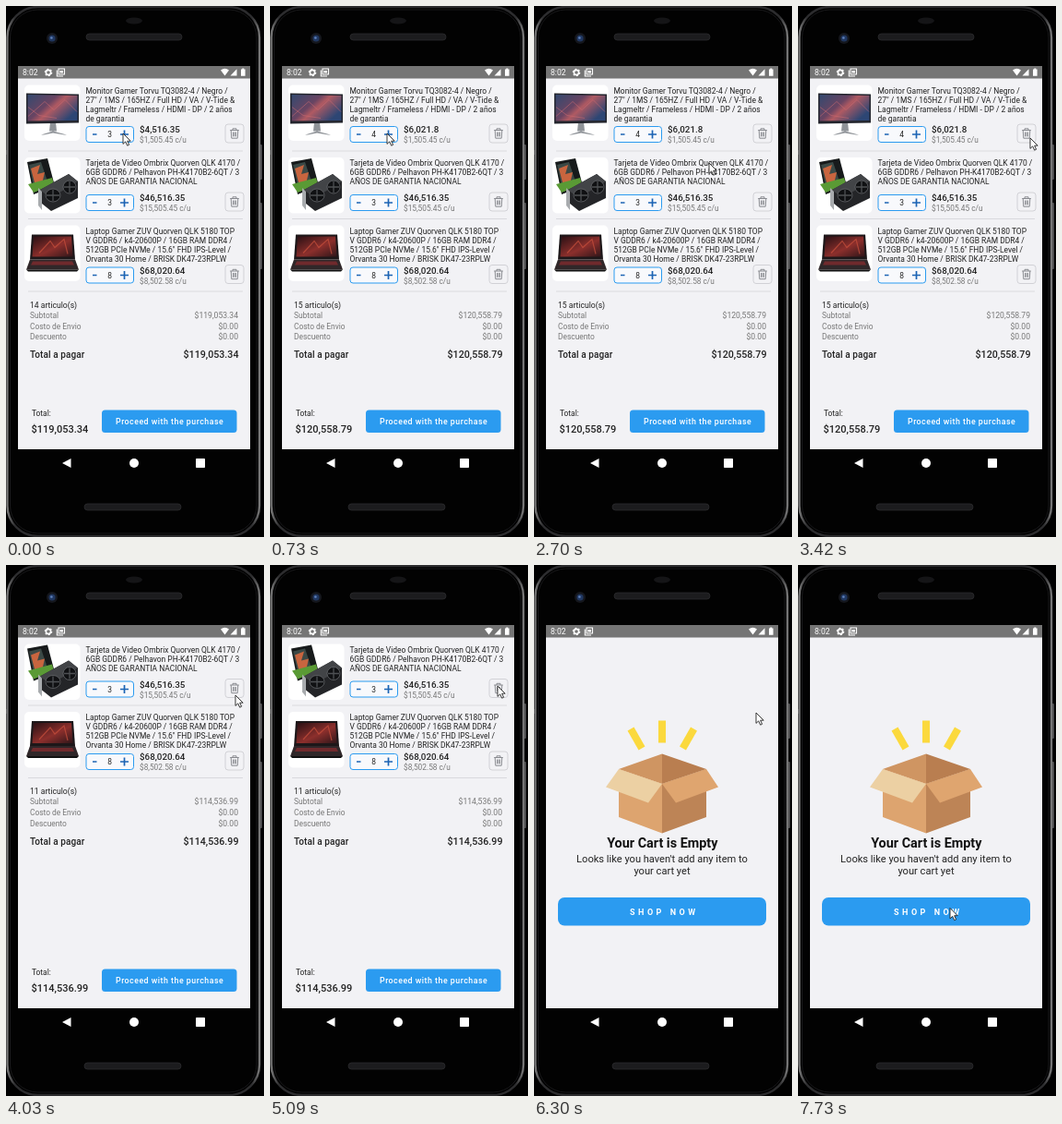
These frames come from a looping animation (280 px wide and 575 px high, 7790 ms). An HTML page:

```html
<!DOCTYPE html>
<html lang="es">
<head>
<meta charset="utf-8">
<title>Cart</title>
<style>
  html, body { margin: 0; width: 100%; height: 100%; overflow: hidden; background: #000; }
  svg { display: block; width: 280px; height: 575px; font-family: Roboto, Arial, sans-serif; }
  text { white-space: pre; }
</style>
</head>
<body>
<svg id="stage" viewBox="0 0 280 575" xmlns="http://www.w3.org/2000/svg">
  <defs>
    <linearGradient id="panel" x1="0" y1="0" x2="1" y2=".6">
      <stop offset="0" stop-color="#33496f"/><stop offset=".45" stop-color="#694462"/>
      <stop offset=".6" stop-color="#b05a62"/><stop offset="1" stop-color="#2d4674"/>
    </linearGradient>
    <linearGradient id="glow" x1="0" y1="0" x2="1" y2="1">
      <stop offset="0" stop-color="#281014"/><stop offset=".55" stop-color="#8c2f2c"/><stop offset="1" stop-color="#30161a"/>
    </linearGradient>
    <linearGradient id="rim" x1="0" x2="1">
      <stop offset="0" stop-color="#777"/><stop offset=".03" stop-color="#2c2c2e"/>
      <stop offset=".97" stop-color="#2c2c2e"/><stop offset="1" stop-color="#777"/>
    </linearGradient>
    <g id="monitor">
      <path d="M28 40h6l1 10h-8zM31 50L18 54h3l10-2 12 2h3z" fill="#8f9398"/>
      <path d="M2 9L59 10V41L2 42Z" fill="#24262e"/>
      <path d="M3.5 10.5L57.5 11.5V38.5L3.5 39Z" fill="url(#panel)"/>
      <path d="M4 34L22 18 32 27 44 16 57 29M4 24L16 33 35 36" fill="none" stroke="#d06d72" stroke-width=".8" opacity=".65"/>
    </g>
    <g id="card">
      <path d="M3 5L25 1 33 31 10 40Z" fill="#171a1b"/>
      <path d="M5 8L18 5 25 26 11 35Z" fill="#3b4946"/>
      <path d="M7 12L17 8 14 18 22 16 19 29 12 31Z" fill="#c8653f"/>
      <path d="M4 29L30 22 32 29 10 38Z" fill="#5a9a35"/>
      <path d="M17 35L48 18 58 26V44L29 58 19 50Z" fill="#242528"/>
      <path d="M17 35L48 18 58 26 28 44Z" fill="#424447"/>
      <ellipse cx="31" cy="41" rx="8" ry="7" fill="#101113" stroke="#66696c" stroke-width=".8"/>
      <ellipse cx="49" cy="32" rx="7" ry="7" fill="#101113" stroke="#66696c" stroke-width=".8"/>
      <path d="M24 41L38 41M31 35V47M43 32H55M49 26V38" stroke="#4d5053" stroke-width="1.3"/>
      <path d="M15 33L19 37V57L15 52Z" fill="#a8abae"/>
    </g>
    <g id="laptop">
      <path d="M8 10H53L55 37H6Z" fill="#1d1719"/>
      <path d="M10 12H51L52.5 34H8.5Z" fill="url(#glow)"/>
      <path d="M16 30L28 17 33 24 43 15 47 31" fill="none" stroke="#c9503c" stroke-width="1.2" opacity=".7"/>
      <path d="M6 37H55L59 48H2Z" fill="#302729"/>
      <path d="M9 39H52L54 43H7Z" fill="#702a2d"/>
      <path d="M2 48H59L57 50H4Z" fill="#111"/>
    </g>
    <g id="trash" fill="none" stroke="#898b90" stroke-width="1">
      <rect x="-10" y="-10" width="20" height="20" rx="3" stroke="#c9c9ce" stroke-width=".8"/>
      <path d="M-4.8 -3.5H4.8M-2 -3.5V-5.2H2V-3.5M-3.8 -3.5L-3.2 5.2H3.2L3.8 -3.5M-1.4 -1.5V3.3M0 -1.5V3.3M1.4 -1.5V3.3"/>
    </g>
  </defs>

  <rect width="280" height="575"/>
  <g fill="#4b4b4d">
    <rect x="274" y="150" width="4" height="38" rx="1"/>
    <rect x="274" y="213" width="4" height="72" rx="1"/>
    <rect x="0" y="156" width="2" height="5"/>
  </g>
  <rect x="1.5" y="1" width="273.5" height="573" rx="33" fill="#000" stroke="url(#rim)" stroke-width="2.4"/>
  <rect x="4.5" y="4" width="267.5" height="567" rx="30" fill="#020202" stroke="#18181a"/>
  <ellipse cx="139" cy="16" rx="9" ry="3.5" fill="#151517"/>
  <circle cx="50" cy="35" r="6" fill="#15171d"/>
  <circle cx="50" cy="35" r="3.6" fill="#203760"/>
  <circle cx="49.4" cy="34.5" r="1.3" fill="#5f83bd"/>
  <g fill="#1c1c1e" stroke="#303033" stroke-width=".7">
    <rect x="87" y="30" width="104" height="7" rx="3.5"/>
    <rect x="85" y="539" width="105" height="7" rx="3.5"/>
  </g>
  <rect x="13" y="65" width="252" height="415" fill="#f2f2f5"/>
  <rect x="13" y="65" width="252" height="13.5" fill="#757575"/>
  <g fill="#fff">
    <text x="18" y="75" font-size="8.6">8:02</text>
    <circle cx="46" cy="72" r="2.6" fill="none" stroke="#fff" stroke-width="1.6"/>
    <circle cx="46" cy="72" r="3.7" fill="none" stroke="#fff" stroke-width="1.2" stroke-dasharray="1.7 2.17"/>
    <path d="M57 68h6.5v6H57zM55.3 69.5V76H62" fill="none" stroke="#fff" stroke-width="1.1"/>
    <path d="M58.5 70H62V72.5H58.5z"/>
    <path d="M233 69.5Q237.5 66 242 69.5L237.5 75.5ZM243.5 75.5H250.5V68.3ZM255 68.5h1.3v-1h2v1h1.3v7.2H255z"/>
    <path d="M70.5 490V500L61 495Z"/>
    <circle cx="139" cy="495" r="5"/>
    <rect x="206" y="490" width="10" height="10" rx=".8"/>
  </g>

  <g id="content"></g>
  <path id="pointer" d="M0 0V11.4L2.7 8.9 4.7 13.2 6.6 12.3 4.7 8.2H8.2Z" fill="#fff" stroke="#222" stroke-width=".9" stroke-linejoin="round"/>
</svg>

<script>
const LOOP = 7790;
const BLUE = '#2b9bf0';
const TOP = 79.5;

const PRODUCTS = [
  { art: 'monitor', unit: 1505.45, height: 78.5, control: 59.5, lines: [
    'Monitor Gamer Torvu TQ3082-4 / Negro /',
    '27" / 1MS / 165HZ / Full HD / VA / V-Tide &amp;',
    'Lagmeltr / Frameless / HDMI - DP / 2 años',
    'de garantia'] },
  { art: 'card', unit: 15505.45, height: 73.5, control: 55, lines: [
    'Tarjeta de Video Ombrix Quorven QLK 4170 /',
    '6GB GDDR6 / Pelhavon PH-K4170B2-6QT / 3',
    'AÑOS DE GARANTIA NACIONAL'] },
  { art: 'laptop', unit: 8502.58, height: 78.5, control: 60, lines: [
    'Laptop Gamer ZUV Quorven QLK 5180 TOP',
    'V GDDR6 / k4-20600P / 16GB RAM DDR4 /',
    '512GB PCIe NVMe / 15.6" FHD IPS-Level /',
    'Orvanta 30 Home / BRISK DK47-23RPLW'] }
];

// Quantities per product from each moment on; 0 means removed.
const CARTS = [
  [0, [3, 3, 8]], [350, [4, 3, 8]], [830, [5, 3, 8]], [1900, [4, 3, 8]],
  [3990, [0, 3, 8]], [5250, [0, 0, 8]], [5900, [0, 0, 0]]
];

// Pointer stops: time, x, y.
const STOPS = [
  [0, 127, 138], [900, 127, 138], [1400, 101, 140.5], [2250, 101, 140.5], [2700, 190, 170],
  [3100, 244, 149], [3400, 252, 143], [3750, 249, 141], [4150, 249, 141], [4600, 247, 131],
  [5900, 247, 131], [6200, 241, 160], [6400, 241, 160], [6950, 167, 376], [7150, 165, 371.5], [LOOP, 165, 371.5]
];

const money = (value, digits = 0) => '$' + value.toLocaleString('en-US',
  { minimumFractionDigits: digits, maximumFractionDigits: 2 });

function label(x, y, size, str, { fill = '#222', weight = 400, anchor = 'start', space = 0 } = {}) {
  return `<text x="${x}" y="${y}" font-size="${size}" fill="${fill}" font-weight="${weight}" ` +
    `text-anchor="${anchor}" letter-spacing="${space}">${str}</text>`;
}

function row(product, count, y) {
  const mid = y + product.control;
  const end = y + product.height;
  return `<rect x="20" y="${y + 6}" width="60.5" height="60.5" rx="5" fill="#fff"/>
    <use href="#${product.art}" x="20" y="${y + 6}"/>` +
    product.lines.map((line, i) => label(86.5, y + 15 + i * 10, 8.45, line)).join('') +
    `<rect x="87" y="${mid - 8.5}" width="51.5" height="17" rx="3" fill="#f8f9fc" stroke="${BLUE}"/>
    <path d="M94 ${mid}h4.5M124 ${mid}h9M128.5 ${mid - 4.5}v9" stroke="#1c64b4" stroke-width="1.7"/>` +
    label(112.5, mid + 3, 8.4, count, { anchor: 'middle' }) +
    label(145, mid - 1.7, 9.8, money(product.unit * count), { weight: 500 }) +
    label(145, mid + 9, 8.3, money(product.unit) + ' c/u', { fill: '#777' }) +
    `<use href="#trash" x="248" y="${mid - 1}"/>
    <path d="M24 ${end - 1}H257" stroke="#d4d4d8" stroke-width=".8"/>`;
}

function cartView(counts) {
  let y = TOP;
  let total = 0;
  let articles = 0;
  let out = '';
  PRODUCTS.forEach((product, i) => {
    if (!counts[i]) return;
    out += row(product, counts[i], y);
    y += product.height;
    total += product.unit * counts[i];
    articles += counts[i];
  });
  const sum = money(total, 2);
  const right = { anchor: 'end' };
  const gray = { fill: '#777' };
  out += label(26, y + 16.5, 8.6, articles + ' articulo(s)');
  [['Subtotal', sum], ['Costo de Envio', '$0.00'], ['Descuento', '$0.00']].forEach(([name, value], i) => {
    const base = y + 27.8 + i * 11.8;
    out += label(26, base, 8.4, name, gray) + label(252, base, 8.6, value, { ...gray, ...right });
  });
  return out +
    label(26, y + 71, 10, 'Total a pagar', { weight: 500, space: .1 }) +
    label(252.5, y + 71, 10.7, sum, { ...right, weight: 500 }) +
    label(28, 444, 8.4, 'Total:') +
    label(27.5, 461.5, 11, sum, { weight: 500 }) +
    `<rect x="104" y="437.5" width="146.5" height="24.5" rx="3.5" fill="${BLUE}"/>` +
    label(177.6, 453, 8.8, 'Proceed with the purchase', { fill: '#fff', weight: 500, anchor: 'middle', space: .5 });
}

function emptyView() {
  const shape = (points, fill) => `<polygon points="${points}" fill="${fill}"/>`;
  const ray = (x, y, angle) =>
    `<rect x="-4" y="-12" width="8" height="24" fill="#fbd93d" transform="translate(${x} ${y}) rotate(${angle})"/>`;
  const middle = { anchor: 'middle' };
  return ray(139, 180.5, 0) + ray(111, 188, -30) + ray(167.5, 188, 30) +
    shape('139,204.5 92,221 139,237', '#cf9562') +
    shape('139,204.5 187,221 139,237', '#b97e50') +
    shape('92,221 139,237 139,290.5 92,273', '#dda46f') +
    shape('187,221 139,237 139,290.5 187,273', '#bd8456') +
    shape('92,221 139,237 124,257.5 78,240.5', '#ecd0a3') +
    shape('187,221 139,237 154,257.5 200,240.5', '#dfa56f') +
    label(139.3, 305.5, 14.4, 'Your Cart is Empty', { ...middle, fill: '#111', weight: 700 }) +
    label(139, 322, 11.1, 'Looks like you haven\'t add any item to', middle) +
    label(139, 335, 11.1, 'your cart yet', middle) +
    `<rect x="26" y="360" width="226" height="30.5" rx="7" fill="${BLUE}"/>` +
    label(104, 379, 9, 'SHOP NOW', { fill: '#fff', weight: 700, space: 3.5 });
}

function pointerAt(t) {
  const i = Math.max(1, STOPS.findIndex(stop => stop[0] > t));
  const [t0, x0, y0] = STOPS[i - 1];
  const [t1, x1, y1] = STOPS[i];
  const u = (t - t0) / (t1 - t0);
  const e = u * u * (3 - 2 * u);
  return [x0 + (x1 - x0) * e, y0 + (y1 - y0) * e];
}

const content = document.getElementById('content');
const pointer = document.getElementById('pointer');
let shown;

function render(t) {
  const counts = CARTS.filter(cart => cart[0] <= t).pop()[1];
  if (counts !== shown) {
    content.innerHTML = counts.some(Boolean) ? cartView(counts) : emptyView();
    shown = counts;
  }
  pointer.setAttribute('transform', `translate(${pointerAt(t).join(' ')})`);
}

const start = performance.now();
function tick() {
  render((performance.now() - start) % LOOP);
  requestAnimationFrame(tick);
}
tick();
</script>
</body>
</html>
```
